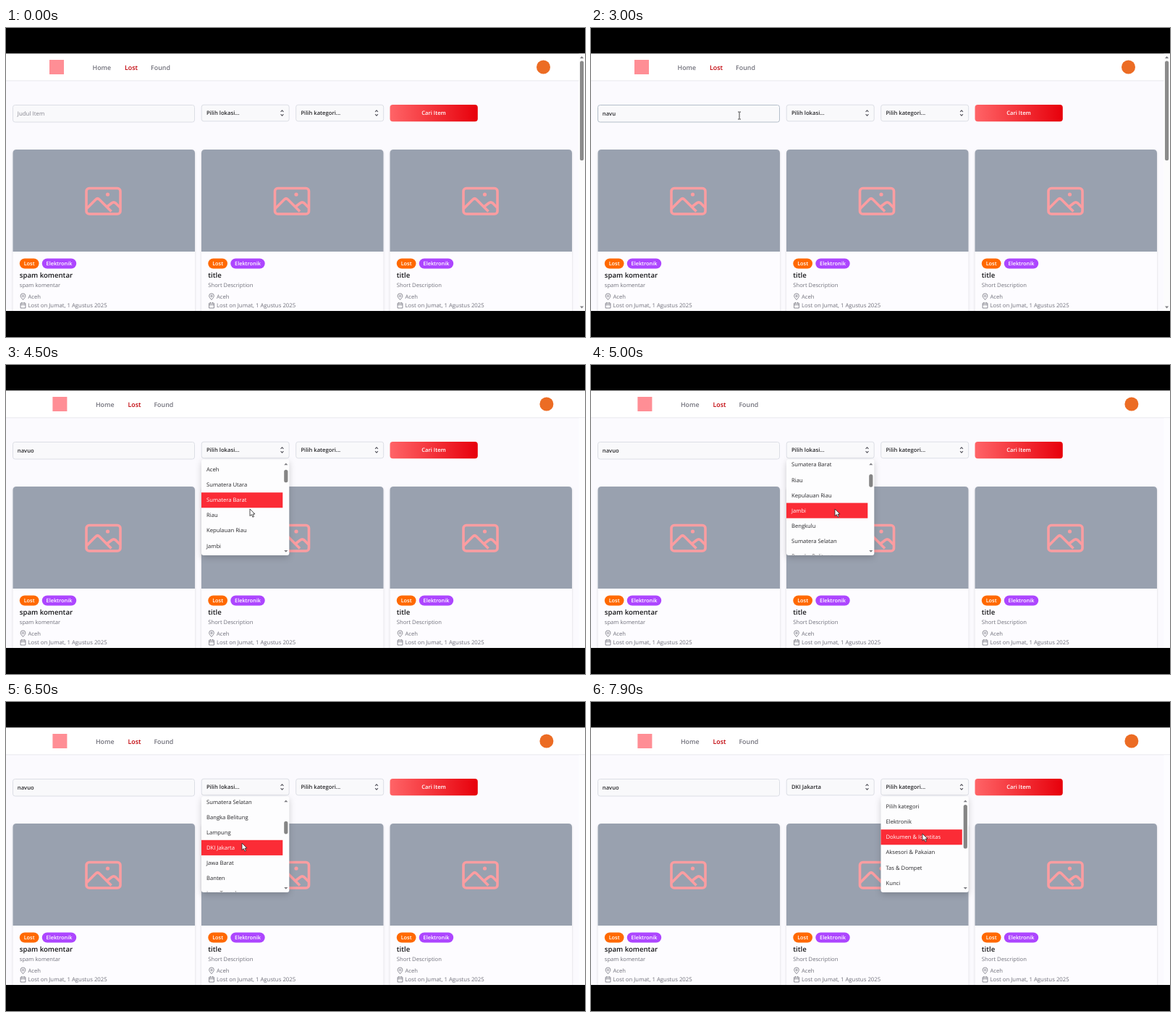
Write an HTML page that moves like this. It is 800 px wide and 427 px high and loops after 8000 ms.

```html
<!DOCTYPE html>
<html lang="id">
<head>
<meta charset="utf-8">
<title>Lost items</title>
<style>
  html, body { margin: 0; width: 100%; height: 100%; overflow: hidden; background: #000; }
  svg { display: block; width: 800px; height: 427px; }
  text { font-family: "Open Sans", "Noto Sans", sans-serif; font-size: 7.65px; text-rendering: geometricPrecision; white-space: pre; }
  .mid { font-weight: 500; }
  .semi { font-weight: 600; }
  .nav { font-size: 8.9px; font-weight: 600; fill: #71717b; }
  .title { font-size: 9.6px; font-weight: 600; fill: #18181b; }
  .soft { fill: #71717b; }
  .dark { fill: #27272a; }
  .pill { font-size: 7.35px; font-weight: 600; fill: #fff; }
  .line { fill: none; stroke: #71717b; stroke-width: .8; }
  .field { fill: #f9f9fb; stroke: #dcdee5; }
  .card { filter: drop-shadow(0 1px 1.5px rgba(0, 0, 0, .14)); }
  .menu { filter: drop-shadow(0 3px 4px rgba(0, 0, 0, .18)); }
</style>
</head>
<body>
<svg id="stage" viewBox="0 0 800 427">
  <defs>
    <linearGradient id="red"><stop stop-color="#ff6467"/><stop offset="1" stop-color="#e7000b"/></linearGradient>
    <clipPath id="page"><rect y="35.5" width="800" height="355.5"/></clipPath>
    <clipPath id="list"><rect y="131" width="800" height="131.5"/></clipPath>
    <g id="photo" fill="none" stroke="#fb9da1" stroke-width="3.6" stroke-linejoin="round">
      <rect x="102.5" y="53.5" width="47" height="35.5" rx="4"/>
      <path d="M103 81.5 115.5 69Q118 66.5 120.5 69L137 85.5M131 79 137.5 74Q140.3 71.8 143 74L149 80"/>
      <circle cx="132" cy="62" r="2.6" fill="#fb9da1" stroke="none"/>
    </g>
    <path id="updown" d="M-1.9 -1.6 0 -3.6 1.9 -1.6M-1.9 1.6 0 3.6 1.9 1.6" fill="none" stroke="#52525b" stroke-width="1.1"/>
    <path id="tri" d="M-2.6 1.4H2.6L0 -1.4Z" fill="#7d7d82"/>
  </defs>
  <rect width="800" height="427"/>
  <g clip-path="url(#page)">
    <rect y="35" width="800" height="357" fill="#fbfafe"/>
    <g id="cards"></g>

    <rect id="input" class="field" x="9.5" y="106.5" width="251" height="23.5" rx="3"/>
    <text id="query" class="mid" x="15.8" y="120.8"></text>
    <rect id="caret" y="112.5" width=".8" height="11" fill="#27272a"/>

    <g id="selects"></g>
    <rect x="530.5" y="106" width="121.3" height="23.2" rx="4" fill="url(#red)"/>
    <text class="semi" x="591" y="120.3" text-anchor="middle" fill="#fff">Cari Item</text>

    <rect y="35" width="800" height="38" fill="#fff"/>
    <rect y="72.4" width="800" height="1" fill="#e8e8ed"/>
    <g id="nav">
      <rect x="60" y="44" width="20" height="20" fill="#ff8e95"/>
      <text class="nav" x="119.5" y="57.6">Home</text>
      <text class="nav" x="164" y="57.6" style="fill:#c10007">Lost</text>
      <text class="nav" x="200" y="57.6">Found</text>
      <circle cx="742.5" cy="54" r="9.5" fill="#ec6c24"/>
    </g>

    <rect x="791.5" y="73.4" width="8.5" height="318" fill="#fdfdff"/>
    <g id="bar">
      <rect x="791.5" y="35" width="8.5" height="357" fill="#fcfcfc"/>
      <rect x="793" y="45.5" width="5.2" height="137.5" rx="2.6" fill="#8b8b8b"/>
      <use href="#tri" x="795.6" y="40.5"/>
      <use href="#tri" transform="translate(795.6 386) scale(1 -1)"/>
    </g>
    <g id="menus"></g>
    <path id="arrow" d="M0 0V9.6L2.3 7.6 3.9 11.2 5.5 10.5 4 7H7Z" fill="#fff" stroke="#222" stroke-width=".8" stroke-linejoin="round"/>
    <path id="beam" d="M-2 -5H-.6L0 -4.5.6 -5H2M0 -4.5V4.5M-2 5H-.6L0 4.5.6 5H2" fill="none" stroke="#333" stroke-width=".9"/>
  </g>
</svg>
<script>
const $ = id => document.getElementById(id);
const LOOP = 8000, STEP = 100, ROW = 21.1, TOP = 134;

// time, x, y of the pointer tip
const POINTER = [
  [0, 470, 412], [100, 460, 391], [900, 265, 185], [1300, 205, 121], [3200, 205, 121],
  [3700, 345, 118], [3800, 345, 118], [4000, 346, 139.5], [4150, 346, 139.5], [4500, 337, 199],
  [6200, 337, 199], [6500, 326, 195], [6700, 326, 195], [7300, 462, 118], [7500, 462, 118], [7900, 458, 182]
];
// time, list offset
const SCROLL = [[4200, 0], [4500, 21.1], [4900, 62], [5200, 86], [5350, 86], [5700, 120.6], [6200, 175.3]];
const TYPED = [[1300, ""], [2100, "n"], [2400, "na"], [2500, "nav"], [2600, "navu"], [3200, "navuo"]];
const FOCUS = [1300, 3800], PICK = 6700;

const PLACES = ["Pilih lokasi", "Aceh", "Sumatera Utara", "Sumatera Barat", "Riau", "Kepulauan Riau", "Jambi",
  "Bengkulu", "Sumatera Selatan", "Bangka Belitung", "Lampung", "DKI Jakarta", "Jawa Barat", "Banten",
  "Jawa Tengah", "DI Yogyakarta"];
const KINDS = ["Pilih kategori", "Elektronik", "Dokumen & Identitas", "Aksesori & Pakaian", "Tas & Dompet", "Kunci"];

const card = (x, title, about) => `
  <g transform="translate(${x} 168)">
    <rect class="card" width="251.5" height="250" rx="5" fill="#fdfcff"/>
    <path d="M0 141V5Q0 0 5 0H246.5Q251.5 0 251.5 5V141Z" fill="#99a1af"/>
    <use href="#photo" x="-1"/>
    <rect x="9.3" y="150.5" width="26.7" height="14" rx="7" fill="#ff6900"/>
    <text class="pill" x="22.6" y="160.2" text-anchor="middle">Lost</text>
    <rect x="40.3" y="150.5" width="47.4" height="14" rx="7" fill="#ad46ff"/>
    <text class="pill" x="64" y="160.2" text-anchor="middle">Elektronik</text>
    <text class="title" x="9.3" y="176.8">${title}</text>
    <text class="soft" x="9.3" y="189.7">${about}</text>
    <path class="line" d="M14 207.6Q10.6 204 10.6 202.3A3.4 3.4 0 0 1 17.4 202.3Q17.4 204 14 207.6Z"/>
    <circle class="line" cx="14" cy="202.4" r="1.2"/>
    <text class="soft" x="21" y="206">Aceh</text>
    <path class="line" d="M10.6 212.3H17.4V219H10.6ZM10.6 214.5H17.4M12.4 211V213M15.6 211V213"/>
    <text class="soft" x="21" y="217.9" style="font-size:7.8px">Lost on Jumat, 1 Agustus 2025</text>
  </g>`;

const select = (x, id, label) => `
  <rect class="field" x="${x}" y="106.2" width="121" height="22.6" rx="3"/>
  <text id="${id}" class="dark semi" x="${x + 6.7}" y="120.3">${label}</text>
  <use href="#updown" x="${x + 111.3}" y="117.5"/>`;

const menu = (id, x, rows, thumb) => `
  <g id="${id}">
    <rect class="menu" x="${x}" y="130.5" width="121.3" height="132.5" rx="3" fill="#fdfdfe"/>
    <g clip-path="url(#list)"><g class="rows">
      <rect class="mark" x="${x}" width="112.3" height="${ROW}" fill="#fb2c36"/>
      ${rows.map((r, i) => `<text class="dark mid" x="${x + 7}" y="${TOP + ROW * i + 13.1}">${r.replace("&", "&amp;")}</text>`).join("")}
    </g></g>
    <rect class="thumb" x="${x + 114.2}" y="142" width="5.2" height="${thumb}" rx="2.6" fill="#858585"/>
    <use href="#tri" x="${x + 116.8}" y="136.8"/>
    <use href="#tri" transform="translate(${x + 116.8} 257.3) scale(1 -1)"/>
  </g>`;

$("cards").innerHTML = card(9.5, "spam komentar", "spam komentar") +
  card(270, "title", "Short Description") + card(530.5, "title", "Short Description");
$("selects").innerHTML = select(270.2, "place", "Pilih lokasi...") + select(400.7, "kind", "Pilih kategori...");
$("menus").innerHTML = menu("places", 270, PLACES, 17.6) + menu("kinds", 400.5, KINDS, 60.5);

// linear value of a keyed table at time t
function at(keys, t, col = 1) {
  const i = keys.findIndex(k => k[0] > t);
  if (i < 0) return keys[keys.length - 1][col];
  if (i === 0) return keys[0][col];
  const a = keys[i - 1], b = keys[i];
  return a[col] + (b[col] - a[col]) * (t - a[0]) / (b[0] - a[0]);
}

const show = (el, on) => { el.style.display = on ? "" : "none"; };

function drawMenu(id, t, from, to, offset, tipY) {
  const el = $(id), open = t >= from && t < to;
  show(el, open);
  if (!open) return false;
  el.style.opacity = t < from + STEP || t >= to - STEP ? .6 : 1;
  const hit = Math.max(0, Math.floor((tipY - 2.5 - TOP + offset) / ROW));
  el.querySelector(".rows").setAttribute("transform", `translate(0 ${-offset})`);
  el.querySelector(".mark").setAttribute("y", TOP + ROW * hit);
  el.querySelector(".thumb").setAttribute("y", 142 + offset * .13);
  el.querySelectorAll(".rows text").forEach((r, i) => { r.style.fill = i === hit ? "#fff" : ""; });
  return true;
}

function draw(t) {
  const x = at(POINTER, t), y = at(POINTER, t, 2);
  const focused = t >= FOCUS[0] && t < FOCUS[1];
  const key = TYPED.filter(k => k[0] <= t).pop() || [0, ""];

  const query = $("query");
  query.textContent = key[1] || "Judul Item";
  query.style.fill = key[1] ? "#27272a" : "#85858f";
  query.style.fontWeight = key[1] ? 600 : 500;
  query.style.fontSize = key[1] ? "7.65px" : "7.9px";
  $("input").style.stroke = focused ? "#b4bfca" : "";
  show($("caret"), focused && t - key[0] < 400);
  $("caret").setAttribute("x", 15.4 + (key[1] ? query.getComputedTextLength() : 0));

  const a = drawMenu("places", t, 3800, 6900, at(SCROLL, t), y);
  const b = drawMenu("kinds", t, 7500, LOOP + STEP, 0, y);
  const locked = a || b;
  $("place").textContent = t >= PICK ? "DKI Jakarta" : "Pilih lokasi...";
  $("nav").setAttribute("transform", `translate(${locked ? 4.4 : 0} 0)`);
  show($("bar"), !locked);

  const overInput = x < 260 && y > 106 && y < 130;
  show($("beam"), overInput);
  show($("arrow"), !overInput);
  $(overInput ? "beam" : "arrow").setAttribute("transform", `translate(${x} ${y})`);
}

const start = performance.now();
function tick() {
  const t = (performance.now() - start) % LOOP;
  draw(Math.floor(t / STEP) * STEP);
  requestAnimationFrame(tick);
}
tick();
</script>
</body>
</html>
```
